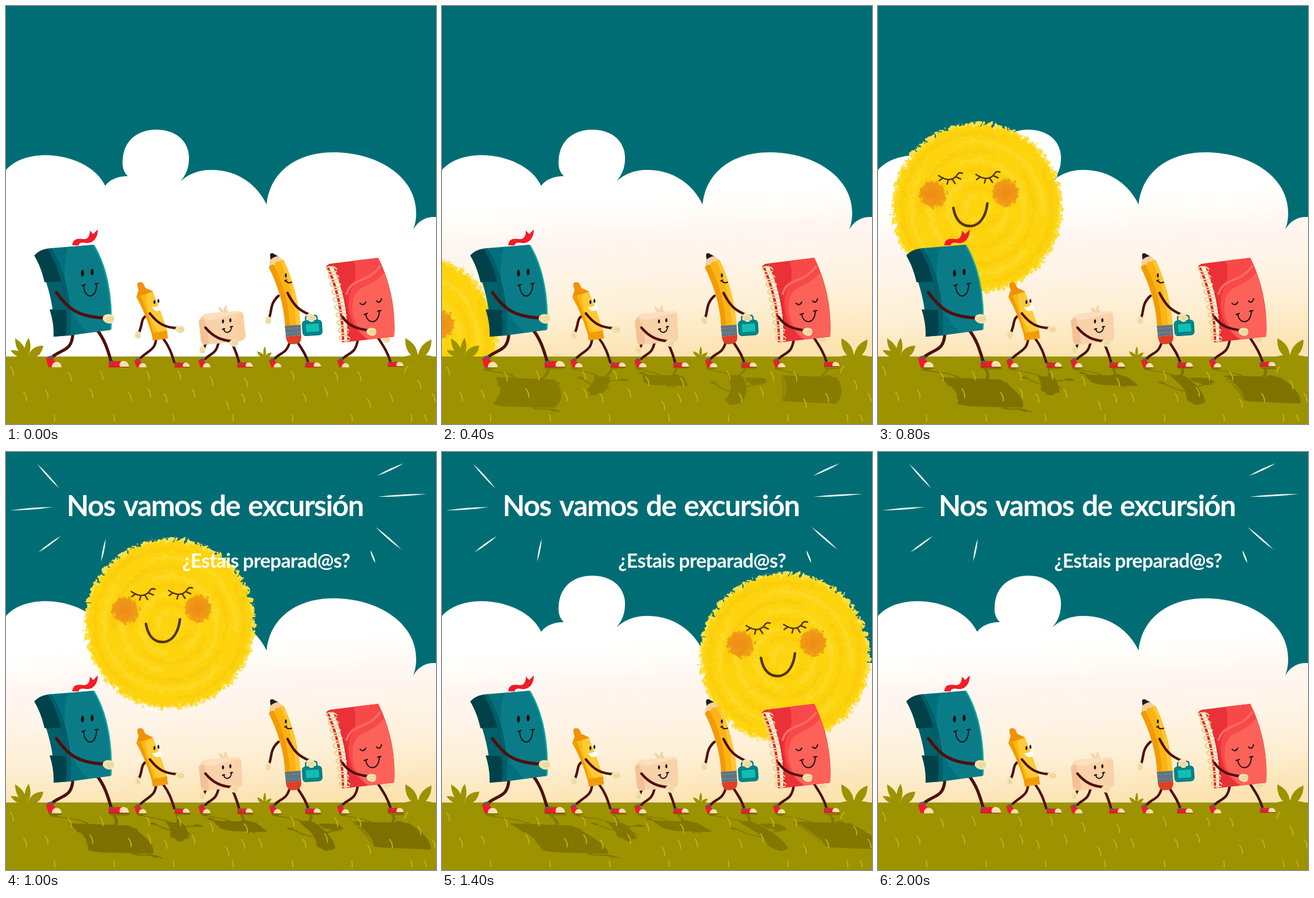
An HTML page for the animation above (2.2 s loop, 759 by 737 pixels).

```html
<!DOCTYPE html>
<html lang="es">
<head>
<meta charset="utf-8">
<title>Excursión</title>
<style>
html, body { margin: 0; width: 100%; height: 100%; overflow: hidden; background: #006d75; }
svg { display: block; width: 100%; height: 100%; }
text { font-family: Lato, "Open Sans", sans-serif; font-weight: 700; fill: #fff; }
.limb { fill: none; stroke: #500f0b; stroke-width: 4.4; stroke-linecap: round; }
.big .limb { stroke-width: 5.4; }
.ink { fill: none; stroke: #1d1010; stroke-width: 2; stroke-linecap: round; }
.eye { fill: #14100f; }
.olive { fill: #9d9200; }
.sunInk { fill: none; stroke: #54330f; stroke-width: 2.6; stroke-linecap: round; }
</style>
</head>
<body>
<svg viewBox="0 0 759 737" preserveAspectRatio="none">
<defs>
  <linearGradient id="dawn" gradientUnits="userSpaceOnUse" x1="380" y1="330" x2="396" y2="618">
    <stop offset="0" stop-color="#fff"/>
    <stop offset=".12" stop-color="#fffdf8"/>
    <stop offset=".24" stop-color="#fff6f2"/>
    <stop offset=".42" stop-color="#fff5ea"/>
    <stop offset=".7" stop-color="#fef0d6"/>
    <stop offset="1" stop-color="#fce3b0"/>
  </linearGradient>
  <radialGradient id="blush">
    <stop offset="0" stop-color="#ec8a12"/>
    <stop offset=".85" stop-color="#f09a16"/>
    <stop offset="1" stop-color="#f5ab12"/>
  </radialGradient>
  <filter id="rough" filterUnits="userSpaceOnUse" x="-170" y="-170" width="340" height="340">
    <feTurbulence type="fractalNoise" baseFrequency=".11" numOctaves="3" seed="4"/>
    <feDisplacementMap in="SourceGraphic" scale="16" xChannelSelector="R" yChannelSelector="G"/>
  </filter>
  <filter id="flat" filterUnits="userSpaceOnUse" x="0" y="600" width="759" height="137" color-interpolation-filters="sRGB">
    <feColorMatrix values="0 0 0 0 .43  0 0 0 0 .38  0 0 0 0 0  0 0 0 1 0"/>
  </filter>
  <g id="heel">
    <path fill="#4b6470" d="M-11 -19 L-2 -21 L1 -15 L-10 -14Z"/>
    <path fill="#ee1c2c" d="M-14 -17 Q-8 -13 -3 -18 L5 -7 L4 0 H-9Z"/>
    <path fill="#f4e3ab" d="M-3 0 C-4 -12 14 -13 14 0Z"/>
  </g>
  <g id="toe">
    <path fill="#4b6470" d="M-18 -10 L-9 -13 L-7 -9 L-17 -7Z"/>
    <path fill="#ee1c2c" d="M-18 -8 Q-10 -7 -6 -11 L6 -11 V0 H-18Z"/>
    <path fill="#f4e3ab" d="M2 -1 C-2 -15 18 -14 18 -1Z"/>
    <path stroke="#a81622" stroke-width="1.2" d="M-18 -.5H18"/>
  </g>
  <g id="hand">
    <path fill="#f3e2ac" d="M-10 -2 C-8 -9 4 -9 9 -5 C12 2 9 9 2 9 C-4 9 -12 4 -10 -2Z"/>
    <path fill="none" stroke="#d3bd80" d="M-4 1 Q2 -3 8 -2 M-2 5 Q4 1 9 2"/>
  </g>
</defs>

<rect width="759" height="737" fill="#006d75"/>
<path id="clouds" fill="#fff" d="M0 289 C16 271 42 263 70 263 C115 263 160 284 175 317 C183 306 197 300 215 300 C206 291 205 281 206 270 C208 238 232 218 265 218 C300 218 323 238 323 268 C323 285 318 297 308 309 C322 296 342 288 365 289 C410 290 443 315 460 350 C465 295 510 258 578 258 C655 258 724 300 724 365 C724 377 722 385 719 394 C728 378 742 371 759 372 V620 H0Z"/>

<g id="sun">
  <g filter="url(#rough)">
    <circle r="147" fill="#fdd411"/>
    <circle r="148" fill="none" stroke="#fde04a" stroke-width="7" stroke-dasharray="9 4 17 3 5 4"/>
    <g id="rings" fill="none" stroke-width="7"></g>
    <circle cx="-79" cy="-24" r="24" fill="url(#blush)"/>
    <circle cx="50" cy="-27" r="23" fill="url(#blush)"/>
  </g>
  <g class="sunInk">
    <path id="lash" d="M-68 -57 Q-48 -43 -36 -57 Q-33 -64 -26 -61 M-60 -53 l-7 5 M-51 -50 l-2 8 M-44 -51 l5 8 M-38 -55 l9 4"/>
    <use href="#lash" x="66" y="-2"/>
    <path stroke-width="4.5" d="M-42 0 C-38 23 -26 33 -10 32 C6 30 16 13 18 -8"/>
  </g>
</g>

<g class="olive">
  <path d="M0 618 H759 V737 H0Z"/>
  <g id="leaves"></g>
</g>
<g id="shade" filter="url(#flat)"><use id="cast2" href="#cast"/></g>
<g id="grass" fill="none" stroke="#cdb60a" stroke-width="1.8" stroke-linecap="round"></g>

<g id="cast">
  <g class="big">
    <path class="limb" d="M118 578 C116 610 98 604 80 620 M160 570 C174 588 179 604 186 628"/>
    <use href="#heel" x="84" y="637"/><use href="#toe" x="199" y="637"/>
    <path fill="#f01c28" d="M117 422 C118 410 126 410 136 411 C146 412 148 404 148 396 L154 402 L162 394 C162 408 155 418 143 418 C135 417 130 416 128 422Z"/>
    <path fill="#00606b" d="M50 440 C56 433 66 428 79 427 C106 470 117 530 113 581 L84 583 C88 540 74 480 50 440Z"/>
    <path fill="#01424a" d="M50 440 C56 433 64 429 74 428 C86 447 94 468 98 486 L68 487 C64 470 58 453 50 440Z M77 535 L105 536 Q108 560 105 581 L84 583 Q85 560 77 535Z"/>
    <path fill="#00717c" d="M79 427 L155 421 C178 460 188 515 185 571 L112 581 C116 530 106 470 79 427Z"/>
    <path fill="#0a7c88" d="M110 425 L155 421 C178 460 188 515 185 571 L146 576 C105 545 95 465 110 425Z"/>
    <path fill="none" stroke="#005560" stroke-width="1.5" d="M74 428 C100 470 110 530 107 581 M79 427 C106 470 117 530 113 581"/>
    <path fill="none" stroke="#10a59f" stroke-width="2.5" d="M155 422 C178 460 188 515 185 570"/>
    <ellipse class="eye" cx="135" cy="471" rx="2.7" ry="6"/><ellipse class="eye" cx="152" cy="469" rx="2.7" ry="6"/>
    <path class="ink" d="M137 492 C138 518 160 518 160 490 M134 493 l6 -2 M157 490 l6 -1"/>
    <path class="limb" d="M89 505 C108 532 125 548 174 550"/>
    <use href="#hand" x="181" y="551"/>
  </g>

  <g>
    <path class="limb" d="M250 545 C237 550 242 560 235 575 M265 587 C263 606 254 606 238 620 M278 587 C288 600 292 612 297 628"/>
    <use href="#hand" transform="translate(233 580) rotate(80) scale(.65)"/>
    <use href="#heel" transform="translate(237 637) scale(.78)"/><use href="#toe" transform="translate(311 637) scale(.75)"/>
    <path fill="#f19108" d="M230 514 L234 501 C230 489 232 487 237 487 C243 487 243 491 246 497 L259 503 L261 512Z"/>
    <path fill="#fbb911" d="M230 513 L259 504 Q276 545 285 575 L258 581 Q248 545 230 513Z"/>
    <path fill="#fdcb35" d="M247 508 L259 504 Q276 545 284 573 L270 577 Q248 550 247 508Z"/>
    <path fill="#f29b08" d="M230 513 L238 511 Q253 550 261 580 L258 581 Q248 545 230 513Z M257 577 L284 572 L286 586 L259 590Z"/>
    <ellipse class="eye" cx="262" cy="522" rx="1.6" ry="3.5"/><ellipse class="eye" cx="269" cy="520" rx="1.6" ry="3.5"/>
    <path fill="#fff" d="M258 531 Q267 531 273 526 Q277 537 267 538 Q261 538 258 531Z"/>
    <path class="limb" d="M254 542 C268 560 280 567 303 568"/>
    <use href="#hand" transform="translate(307 570) scale(.78)"/>
  </g>

  <g>
    <path class="limb" d="M374 575 C367 588 353 588 350 602 M375 594 C370 616 360 612 352 622 M399 594 C406 610 408 615 411 627"/>
    <use href="#hand" transform="translate(347 606) rotate(80) scale(.65)"/>
    <use href="#heel" transform="translate(350 637) scale(.78)"/><use href="#toe" transform="translate(422 637) scale(.76)"/>
    <path fill="#f7d0a0" d="M383 542 Q376 538 375 530 Q382 533 384 539 Q384 532 389 527 Q391 533 387 538 L393 534 Q391 541 386 543Z"/>
    <path id="block" fill="#f9d2aa" d="M345 548 Q348 543 356 542 L408 538 Q414 538 415 544 L417 583 Q417 591 409 592 L352 597 Q345 597 344 589 L340 556Z"/>
    <path id="side" fill="#fbd09f" d="M408 538 Q417 538 419 545 L423 582 Q422 590 409 592Z"/>
    <path fill="#f3c193" d="M341 556 Q345 549 349 553 Q359 577 358 596 L351 597 Q346 597 344 589Z"/>
    <path fill="#fddfbf" d="M347 547 Q350 543 356 542 L408 538 Q412 538 413 541 L364 553 Q353 555 347 547Z"/>
    <ellipse class="eye" cx="383" cy="556" rx="1.8" ry="3.5"/><ellipse class="eye" cx="396" cy="554" rx="1.8" ry="3.5"/>
    <path class="ink" stroke-width="1.7" d="M384 569 C386 579 398 577 398 565 M382 570 l4 -1 M396 566 l4 -1"/>
    <path class="limb" d="M352 567 C368 586 382 589 398 591"/>
    <use href="#hand" transform="translate(402 594) scale(.75)"/>
  </g>

  <g>
    <path class="limb" d="M481 511 C465 525 470 538 464 551 M501 592 C495 614 485 610 474 622 M514 592 C524 608 528 612 533 627"/>
    <use href="#hand" transform="translate(463 554) rotate(80) scale(.65)"/>
    <use href="#heel" transform="translate(475 637) scale(.78)"/><use href="#toe" transform="translate(542 637) scale(.77)"/>
    <path fill="#f6cf9d" d="M467 442 L480 440 L490 449 Q476 450 464 462Z"/>
    <path fill="#241a1b" d="M466 439 Q467 435 471 436 L480 441 Q473 442 467 447Z"/>
    <path fill="#fcb414" d="M464 461 Q470 454 473 457 Q476 449 482 451 Q486 446 490 448 C507 482 518 530 520 564 L493 566 C491 530 481 495 464 461Z"/>
    <path fill="#f19b05" d="M464 461 Q470 454 473 457 C490 490 500 530 501 565 L493 566 C491 530 481 495 464 461Z"/>
    <path fill="#fdc735" d="M484 449 Q487 446 490 448 C507 482 518 530 520 564 L512 564 C510 525 500 480 484 449Z"/>
    <path fill="#617480" d="M492 564 L520 562 L521 580 L494 583Z"/>
    <path fill="none" stroke="#8897a0" stroke-dasharray="3 2" d="M493 569 L520 567 M494 577 L520 575"/>
    <path fill="#df3f25" d="M494 583 L521 580 Q522 591 517 594 Q508 598 499 595 Q495 591 494 583Z"/>
    <ellipse class="eye" cx="494" cy="475" rx="1.7" ry="3.5"/>
    <path class="ink" stroke-width="1.7" d="M494 484 Q497 490 504 487 M492 485 l3 -2"/>
    <g transform="rotate(-4 540 567)" stroke="#007b83" stroke-width="2.5">
      <path fill="none" d="M530 555 v-5 q0 -4 4 -4 h12 q4 0 4 4 v5"/>
      <rect x="524" y="555" width="33" height="25" rx="5" fill="#00918f"/>
      <rect x="528" y="559" width="26" height="17" rx="3" fill="#12bdb3"/>
    </g>
    <path class="limb" d="M497 506 C510 532 520 537 535 544"/>
    <use href="#hand" transform="translate(538 549) rotate(30) scale(.8)"/>
  </g>

  <g>
    <use href="#hand" transform="translate(671 588) scale(.7)"/>
    <path class="limb" d="M621 588 C617 614 606 610 594 622 M656 584 C668 602 674 612 679 628"/>
    <use href="#heel" transform="translate(595 637) scale(.78)"/><use href="#toe" transform="translate(688 636) scale(.77)"/>
    <path fill="#e2242c" d="M565 460 Q567 455 575 454 C598 500 610 545 607 592 L593 593 C592 545 584 500 565 460Z"/>
    <path fill="#fff2ea" d="M570 460 L577 459 C596 500 604 545 602 592 L597 592 C597 545 588 500 570 460Z"/>
    <path fill="#ea3137" d="M575 454 L657 444 C680 490 688 540 685 583 L606 592 C608 545 598 500 575 454Z"/>
    <path fill="#f8494a" d="M614 449 L657 444 C680 490 688 540 685 583 L640 588 C608 572 598 525 609 500 Q622 482 614 449Z"/>
    <path fill="#fd6259" d="M668 470 C681 510 687 545 685 583 L640 588 C618 572 606 540 614 515 C622 490 640 500 668 470Z"/>
    <path fill="none" stroke="#fb6a62" stroke-width="4" d="M601 509 C609 477 638 491 661 458"/>
    <g id="coil" fill="none" stroke="#ecd391" stroke-width="2.4" stroke-linecap="round"></g>
    <path class="ink" d="M625 524 Q631 530 635 522 M654 520 Q660 526 663 516 M635 543 C637 562 659 562 659 537 M632 544 l6 -2 M656 538 l6 -1"/>
    <path class="limb" d="M594 548 C605 565 620 569 640 572"/>
    <use href="#hand" transform="translate(645 574) scale(.85)"/>
  </g>
</g>

<g id="title">
  <g font-size="51" letter-spacing="-1.6">
    <text x="107" y="113">Nos</text><text x="207" y="113">vamos</text>
    <text x="360" y="113">de</text><text x="427" y="113">excursión</text>
  </g>
  <g font-size="34.5" letter-spacing="-.7">
    <text x="311" y="204">¿Estais</text><text x="418" y="204">preparad@s?</text>
  </g>
  <g id="rays" fill="#f4fbf2"></g>
</g>
</svg>

<script>
const $ = id => document.getElementById(id);
const fill = (id, items) => { $(id).innerHTML = items.join(''); };
const path = d => `<path d="${d}"/>`;

// Two-pointed blade from (x, y) to (u, v)
function blade([x, y, u, v, w]) {
  const len = Math.hypot(u - x, v - y);
  const nx = (y - v) / len * w, ny = (u - x) / len * w;
  const mx = (x + u) / 2, my = (y + v) / 2;
  return path(`M${x} ${y} Q${mx + nx} ${my + ny} ${u} ${v} Q${mx - nx} ${my - ny} ${x} ${y}Z`);
}

fill('rays', [
  [55, 21, 94, 64], [7, 103, 83, 97], [57, 177, 97, 148], [176, 153, 168, 193],
  [655, 42, 702, 20], [656, 79, 742, 74], [652, 132, 698, 172], [643, 173, 652, 196]
].map(r => blade([...r, 3])));

fill('leaves', [
  [37, 622, 16, 586, 12], [36, 622, 40, 585, 10], [38, 622, 66, 599, 15], [40, 622, 8, 607, 10],
  [727, 624, 705, 586, 15], [727, 624, 751, 588, 15], [700, 619, 757, 619, 9],
  [456, 621, 457, 600, 5], [457, 621, 443, 609, 6], [456, 621, 469, 611, 6]
].map(blade));

const tufts = [
  8, 636, 110, 646, 166, 644, 31, 681, 69, 677, 148, 675, 216, 681, 250, 675, 279, 684,
  248, 644, 303, 643, 328, 675, 360, 654, 388, 697, 416, 684, 446, 682, 421, 656, 503, 644,
  524, 683, 562, 673, 580, 645, 621, 645, 638, 693, 677, 683, 727, 660, 752, 683
];
const blades = [];
for (let i = 0; i < tufts.length; i += 2) blades.push(path(`M${tufts[i]} ${tufts[i + 1]} q6 7 5 15`));
for (let i = 0; i < 7; i++) blades.push(path(`M${85 + i * 105} 721 q2 6 1 11`));
blades.push(path('M710 635 q-6 5 -6 11'), path('M738 721 q4 5 4 11'));
fill('grass', blades);

const coils = [];
for (let i = 0; i < 10; i++) {
  const x = 584 + 30 * i / 9 - i * i * .09, y = 463 + i * 13.5;
  coils.push(path(`M${x} ${y + 1} c-6 -7 -20 -5 -18 0 c2 6 13 5 17 4`));
}
fill('coil', coils);

const rings = [];
for (let i = 0; i < 8; i++) {
  const r = 20 + i * 16, tint = i % 2 ? '#fbcb0c' : '#fedb2c';
  rings.push(`<circle r="${r}" stroke="${tint}" stroke-dasharray="${r * 2} ${r * .6}" transform="rotate(${i * 77})" opacity=".75"/>`);
}
fill('rings', rings);

// Each step: sun x, sun y, shadow slant, shadow strength
const steps = [
  null,
  [-52, 588, 0, .42],
  [-52, 588, .2, .45],
  [121, 375, .23, .48],
  [175, 356, .46, .62],
  [289, 303, .48, .68],
  [466, 318, .6, .62],
  [605, 363, .64, .55],
  [739, 463, .88, .45],
  [850, 615, 1, .4],
  null
];
const BEAT = 200, FLOOR = 637, SQUASH = .33;
const show = (id, on) => $(id).setAttribute('display', on ? 'inline' : 'none');

function draw(time) {
  const n = Math.floor(time / BEAT) % steps.length, step = steps[n];
  show('sun', step);
  show('shade', step);
  show('title', n >= 5);
  show('side', n === 0);
  $('clouds').setAttribute('fill', n ? 'url(#dawn)' : '#fff');
  if (!step) return;
  const [x, y, slant, dark] = step;
  $('sun').setAttribute('transform', `translate(${x} ${y})`);
  $('cast2').setAttribute('transform', `matrix(1 0 ${-slant} ${-SQUASH} ${FLOOR * slant} ${FLOOR * (1 + SQUASH)})`);
  $('shade').setAttribute('opacity', dark);
}

let last = -1;
function tick() {
  const now = performance.now(), beat = Math.floor(now / BEAT);
  if (beat !== last) draw(now);
  last = beat;
  requestAnimationFrame(tick);
}
tick();
</script>
</body>
</html>
```
